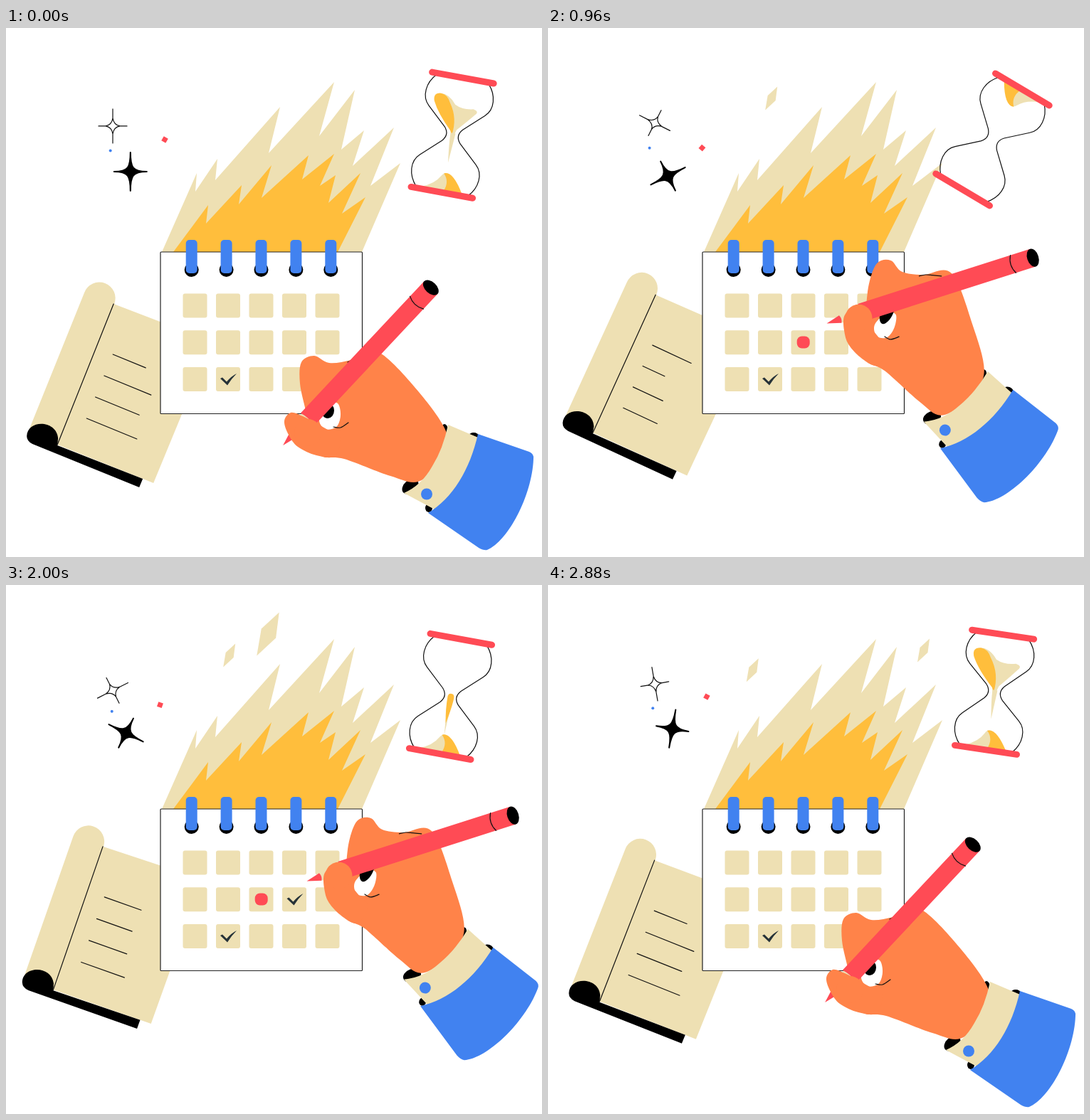
Animation, 753 px wide and 744 px high, one loop 2.96 s. Source, as an HTML page:

```html
<!DOCTYPE html>
<html lang="en">
<head>
<meta charset="utf-8">
<title>Deadline</title>
<style>
html, body { margin: 0; width: 100%; height: 100%; overflow: hidden; background: #fff; }
svg { display: block; width: 100%; height: 100%; }
.sand { fill: #eee0b3; }
.gold { fill: #ffbe3c; }
.red { fill: #ff4b55; }
.blue { fill: #4182f0; }
.skin { fill: #ff8349; }
.ink { fill: #263238; }
.line { fill: none; stroke: #111; stroke-width: 1.2; stroke-linecap: round; }
.cap { stroke: #ff4b55; stroke-width: 9; stroke-linecap: round; }
</style>
</head>
<body>
<svg viewBox="0 0 753 744">
  <defs>
    <path id="tick" d="M301 493L304 491.500L310 497.500Q316 490 324 486Q317 493 311 502.500Z"/>
    <clipPath id="reveal"><rect id="window" y="425" height="34"/></clipPath>
  </defs>

  <g id="scroll">
    <path d="M151 388L289 441L207 640L72 586Z" class="sand"/>
    <path d="M110 372L31 568L72 587L152 388A22 22 0 0 0 110 372Z" class="sand"/>
    <path d="M29 574C30 550 71 551 73 577L72 587L192 634L187 646L37 585Q29 581 29 574Z"/>
    <path d="M151 388L72 586" class="line"/>
    <path id="notes" class="line"/>
  </g>

  <path class="sand" d="M219 315L268 204L266 230L297 184L294 214L385 111L369 176L461 76L440 152L490 87L471 171L503 144L487 194L545 140L512 222L554 190L500 315Z"/>
  <path class="gold" d="M235 315L284 249L281 275L331 221L327 248L373 193L359 239L425 179L416 213L461 177L441 222L463 207L453 246L498 204L472 261L505 238L466 315Z"/>
  <g id="sparks" class="sand"></g>

  <g id="glass">
    <g id="walls"></g>
    <g id="fill">
      <g id="bulk">
        <path class="sand" d="M-28 -59Q-15 -60 -4 -46Q8 -40 24 -44Q34 -42 28 -36Q20 -26 5 -9Q3 -4 2 3L-2 2L-14 -45Z"/>
        <path class="gold" d="M-28 -59Q-40 -58 -36 -46Q-27 -28 -4 -6L-1 0Q3 -26 -12 -47Q-18 -59 -28 -59Z"/>
      </g>
      <path id="spout" class="sand"/>
      <path id="drop" class="gold" d="M-4 0Q-3 -5 2 -4Q6 -3 5 5Q4 20 0 38Q-4 18 -4 0Z"/>
      <path class="sand" d="M-30 79Q-12 72 -5 59Q0 50 9 57L28 79Z"/>
      <path class="gold" d="M-2 55Q10 49 28 79L2 79Q8 65 -2 55Z"/>
    </g>
    <path class="cap" d="M-44 -82H44M-44 82H44"/>
  </g>

  <path id="starA" class="line" d="M0 -24V-10M0 24V10M-20 0H-9M20 0H9M0 -11Q1.500 -1.500 10 0Q1.500 1.500 0 11Q-1.500 1.500 -10 0Q-1.500 -1.500 0 -11Z"/>
  <path id="starB" d="M0 -27C0 -6 3 0 23 0C3 0 0 6 0 27C0 6 -3 0 -23 0C-3 0 0 -6 0 -27Z" stroke="#000" stroke-width="2" stroke-linejoin="round"/>
  <rect id="chip" class="red" x="-3.500" y="-3.500" width="7" height="7"/>
  <circle id="speck" class="blue" r="2"/>

  <rect x="217" y="315" width="283.500" height="227.500" rx="1" fill="#fff" stroke="#222" stroke-width="1.200"/>
  <g id="grid"></g>
  <use href="#tick" class="ink"/>
  <rect id="dot" class="red" x="-9" y="-8.500" width="18" height="17" rx="7"/>
  <g clip-path="url(#reveal)"><use href="#tick" class="ink" x="93.500" y="-52"/></g>

  <g class="arm">
    <ellipse cx="616" cy="566" rx="5" ry="9"/>
    <ellipse cx="568" cy="645" rx="9" ry="13" transform="rotate(50 568 645)"/>
  </g>
  <path id="body" class="skin"/>
  <path id="hole" fill="#fff"/>
  <ellipse id="gap" rx="9"/>
  <path id="knuckle" class="line"/>
  <g id="pencil">
    <path class="sand" d="M18 -5L57 -13V13L18 5Z"/>
    <path class="red" d="M0 0L20 -5.500Q23 0 20 5.500ZM50 -13H304V13H50Q54 0 50 -13Z"/>
    <path class="line" d="M275 -13Q268 0 275 13"/>
    <ellipse cx="304" rx="8" ry="13"/>
  </g>
  <path id="thumb" class="skin"/>
  <circle id="pad" class="skin" r="19"/>
  <path id="crease" class="line"/>
  <g class="arm">
    <ellipse cx="657" cy="574" rx="7" ry="5"/>
    <ellipse cx="594" cy="675" rx="5" ry="6"/>
    <path class="sand" d="M621 558L668 578Q655 640 602 677L559 654Q584 643 599 616Q614 592 621 558Z"/>
    <circle class="blue" cx="591" cy="655.500" r="8"/>
    <path class="blue" d="M663 571L735 596Q742 599 741 606C739 658 705 722 676 734Q671 735 664 731L593 682C627 662 652 621 663 571Z"/>
  </g>
</svg>
<script>
const LOOP = 2960, STEP = 80, DEG = Math.PI / 180;
const $ = id => document.getElementById(id);
const clamp = v => Math.max(0, Math.min(1, v));
const ramp = (t, a, b) => clamp((t - a) / (b - a));
const swing = u => u < .5 ? 4 * u ** 3 : 1 - 4 * (1 - u) ** 3;
const set = (id, name, value) => $(id).setAttribute(name, value);
const place = (id, x, y, r = 0, s = 1) =>
  set(id, 'transform', `translate(${x} ${y}) rotate(${r}) scale(${s})`);

// The arm's stops: time, cuff button x and y, how far the hand is raised
const stops = [
  [0, 591, 655, 0], [120, 591, 655, 0], [560, 527, 572, 1], [760, 515, 580, .78], [960, 558, 565, .89],
  [1200, 574, 573, .84], [1600, 576, 581, .69], [2000, 589, 566, .89], [2480, 593, 665, -.22], [2800, 591, 655, 0]
];
function armAt(t) {
  const i = Math.max(0, stops.findLastIndex((s, k) => s[0] <= t && k < stops.length - 1));
  const [a, b] = [stops[i], stops[i + 1]];
  const ease = (1 - Math.cos(Math.PI * ramp(t, a[0], b[0]))) / 2;
  return a.map((v, k) => v + (b[k] - v) * ease).slice(1);
}

// Resting hand; raising it bends every point around the button
const points = text => text.split(' ').map(p => p.split(',').map(Number));
const hand = {
  body: points('413,500 415,470 433,461 454,471 485,467 522,455 580,512 620,572 610,610 579,638 540,630 475,606 440,600 425,560 421,538'),
  hole: points('440,550 452,530 466,528 470,545 464,561 448,564'),
  thumb: points('391,553 400,541 417,546 436,556 452,565 470,575 462,602 436,601 410,589 397,572'),
  crease: points('460,561 470,562 481,555'),
  knuckle: points('480,470 488,466 498,464 510,462')
};
const closed = ['body', 'hole', 'thumb'];

// Smooth curve through points
function curve(p, loop) {
  const n = p.length;
  const get = i => loop ? p[(i + n) % n] : p[Math.max(0, Math.min(n - 1, i))];
  let d = 'M' + p[0];
  for (let i = 0; i < (loop ? n : n - 1); i++) {
    const [a, b, c, e] = [get(i - 1), get(i), get(i + 1), get(i + 2)];
    d += `C${b[0] + (c[0] - a[0]) / 6} ${b[1] + (c[1] - a[1]) / 6} ` +
      `${c[0] - (e[0] - b[0]) / 6} ${c[1] - (e[1] - b[1]) / 6} ${c}`;
  }
  return d + (loop ? 'Z' : '');
}

function drawArm(t) {
  const [x, y, up] = armAt(t);
  const around = (r, a) => [x + r * Math.cos(a), y + r * Math.sin(a)];
  const bend = ([px, py]) => {
    const dx = px - 591, dy = py - 655, a = Math.atan2(dy, dx);
    const turn = 24 - 8 * ramp(a, -1.9, -1.2);
    return around(Math.hypot(dx, dy) * (1 + .13 * up * (a + 2.25)), a + turn * up * DEG);
  };
  for (const id in hand) set(id, 'd', curve(hand[id].map(bend), closed.includes(id)));
  place('gap', ...bend([452, 538 - 14 * up]), 24 * up);
  set('gap', 'ry', 11 + 11 * up);
  place('pad', ...bend([424 - 12 * up, 569 - 23 * up]));
  place('pencil', ...around(213 + 12 * up, (26.2 * up - 161.4) * DEG), 32.8 * up - 46.9);
  const turn = 19.2 * Math.sin(clamp(up) * Math.PI / 2);
  for (const g of document.querySelectorAll('.arm'))
    g.setAttribute('transform', `translate(${x} ${y}) rotate(${turn}) translate(-591 -655)`);
}

function drawGlass(t, cos) {
  const angle = 10.4 - 180 * (swing(ramp(t, 640, 1100)) + swing(ramp(t, 2310, 2770)))
    - 2 * Math.sin(Math.PI * ramp(t, 2770, LOOP));
  place('glass', 625.3 + 1.8 * cos, 155 - 4.3 * cos, angle);

  // Sand drops into the other bulb as each flip ends
  const turns = (t >= 1040) + (t >= 2480);
  const age = t - [-480, 1040, 2480][turns];
  const left = 1 - ramp(age, 440, 1060);
  set('fill', 'transform', `rotate(${180 * turns})`);
  set('bulk', 'transform', `scale(${left > .18 ? left : 0})`);
  set('spout', 'd', `M-3 -3H4Q3 10 1 ${38 + 20 * (1 - left)}Q-3 10 -3 -3Z`);
  set('spout', 'opacity', left > 0 ? 1 : 0);
  set('drop', 'opacity', left > 0 && left < .25 ? 1 : 0);
}

function drawScroll(phase) {
  const x = 67 + 5.5 * Math.cos(phase + .35), y = 574.5 + 11.5 * Math.cos(phase);
  set('scroll', 'transform', `translate(${x} ${y}) rotate(${3 * Math.sin(phase)}) translate(-72 -586)`);
  const wave = Math.cos(phase + .5);
  const sizes = [55 - 6 * wave, 52 + 22 * wave, 56 + 12 * wave, 64 + 14 * wave];
  set('notes', 'd', sizes.map((n, i) =>
    `M${150 - 12.3 * i} ${459 + 30 * i}l${n * .925} ${n * .38}`).join(''));
}

// Embers drift up and right, then shrink away
const embers = [
  { x: 282, y: 124, vx: .066, vy: -.052, size: 1, life: 560, births: [480, 1520, 2120, 2800] },
  { x: 520, y: 108, vx: .075, vy: -.16, size: 1, life: 260, births: [380, 1540, 2780] },
  { x: 345, y: 85, vx: .046, vy: -.032, size: 1.85, life: 580, births: [0, 1500, 2080] }
];
function drawEmbers(t) {
  embers.forEach((e, i) => {
    const age = t - e.births.findLast(b => b <= t);
    const alive = age < e.life ? ramp(age, 0, 60) * ramp(age, e.life, e.life - 80) : 0;
    place('ember' + i, e.x + e.vx * (age || 0), e.y + e.vy * (age || 0), 0, e.size * alive);
  });
}

function build() {
  embers.forEach((_, i) => {
    $('sparks').innerHTML += `<path id="ember${i}" d="M8.5 -16.5L6 3L-8.5 16.5L-5 -4Z"/>`;
  });
  for (const side of [-1, 1])
    $('walls').innerHTML += `<path class="line" transform="scale(${side} 1)" d="M37 -80C50 -66 52 -46 40 -35L13 -10Q4 0 13 10L40 35C52 46 50 66 37 80"/>`;
  let html = '';
  for (let c = 0; c < 5; c++) {
    for (let r = 0; r < 3; r++)
      html += `<rect class="sand" x="${248.5 + c * 46.5}" y="${373.5 + r * 51.8}" width="34" height="34" rx="3"/>`;
    const x = 260.7 + c * 48.9;
    html += `<circle cx="${x}" cy="340" r="10"/><rect class="blue" x="${x - 8}" y="298" width="16" height="47" rx="5"/>`;
  }
  $('grid').innerHTML = html;
}

function draw(t) {
  const phase = t / LOOP * 2 * Math.PI, sin = Math.sin(phase), cos = Math.cos(phase);
  const spin = t / LOOP * 360;
  drawScroll(phase);
  drawEmbers(t);
  drawGlass(t, cos);
  place('starA', 150, 140 - 8.5 * Math.sin(phase + .25), spin);
  place('starB', 170.5 + 4.3 * cos, 206.3 - 4.2 * cos, -spin);
  place('chip', 218.5 + 4.5 * cos, 165 - 8 * cos, 30 + 12 * sin);
  place('speck', 146 - 3.5 * Math.sin(phase - .2), 173 - 5 * Math.sin(phase + .1));
  place('dot', 358.7, 442, 0, ramp(t, 640, 800) - ramp(t, 2300, 2480));
  const from = 394 + 24 * ramp(t, 2320, 2600), to = 394 + 24 * ramp(t, 1490, 1800);
  set('window', 'x', from);
  set('window', 'width', Math.max(0, to - from));
  drawArm(t);
}

build();
const start = performance.now();
function frame(now) {
  const t = Math.max(0, now - start) % LOOP;
  draw(Math.floor(t / STEP) * STEP);
  requestAnimationFrame(frame);
}
draw(0);
requestAnimationFrame(frame);
</script>
</body>
</html>
```
